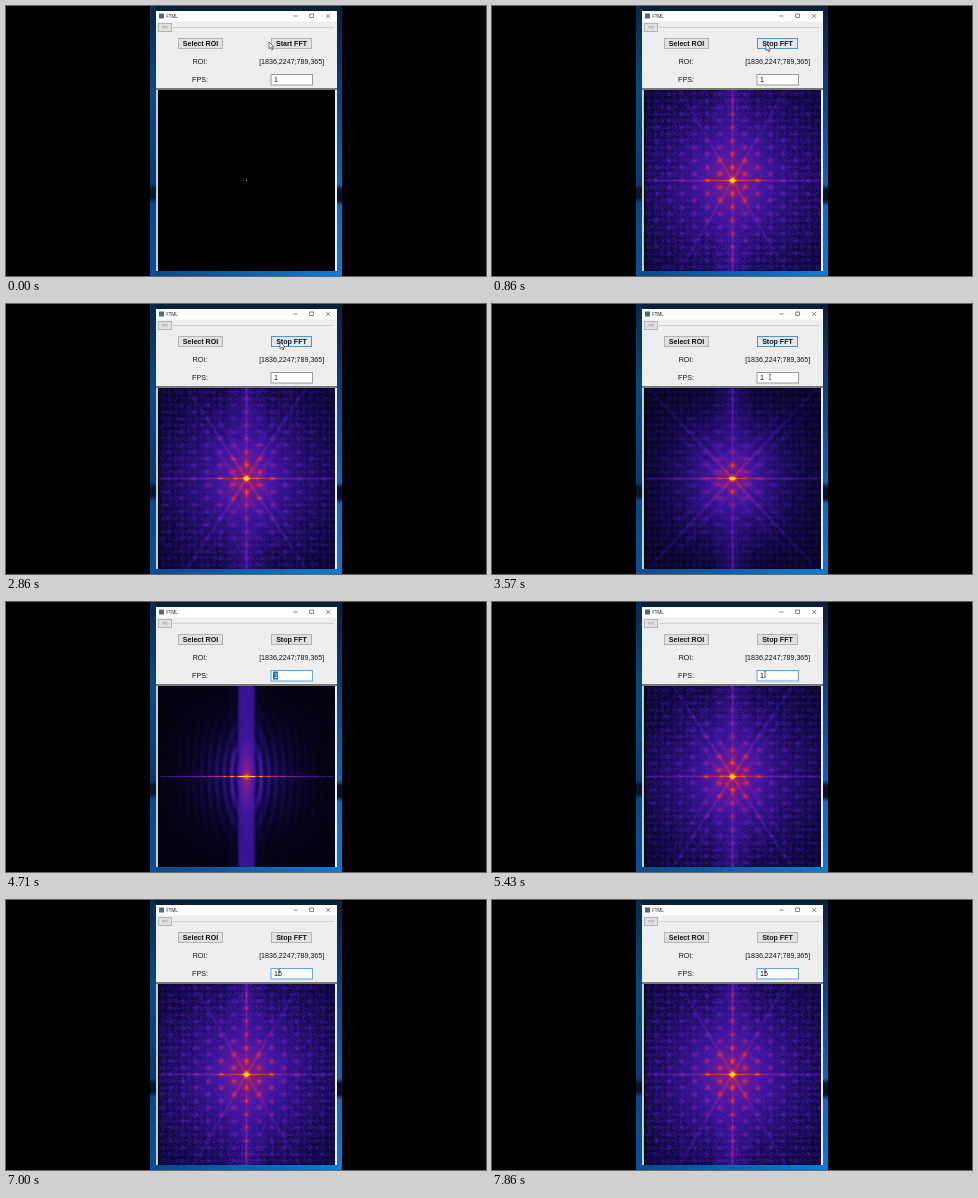
Animation of 480 by 270 pixels, one loop 8 s. Source, as an HTML page with a canvas:

```html
<!DOCTYPE html>
<html lang="en">
<head>
<meta charset="utf-8">
<title>Live FFT</title>
<style>
  html, body { margin: 0; width: 100%; height: 100%; overflow: hidden; background: #000; }
  svg, canvas { position: absolute; left: 0; top: 0; display: block; }
  canvas { left: 153px; top: 84px; }
  text { font: 7.1px "Liberation Sans", Arial, sans-serif; fill: #111; }
  .bold { font-weight: bold; }
  .mid { text-anchor: middle; }
  .title { font: 4.6px "Open Sans", sans-serif; }
  .button { fill: #e1e1e1; stroke: #b4b4b4; }
  .button.active { fill: #e1e8ef; stroke: #4a96d2; }
  #box { fill: #fff; stroke: #9a9a9a; }
  #box.active { stroke: #5fa6de; }
</style>
</head>
<body>
<svg width="480" height="270" viewBox="0 0 480 270">
  <defs>
    <linearGradient id="left" x2="0" y2="1">
      <stop offset="0" stop-color="#062a50"/><stop offset=".32" stop-color="#0c4a82"/>
      <stop offset=".66" stop-color="#083a70"/><stop offset=".68" stop-color="#031630"/>
      <stop offset=".71" stop-color="#031630"/><stop offset=".73" stop-color="#084888"/>
      <stop offset="1" stop-color="#0a5098"/>
    </linearGradient>
    <linearGradient id="right" x2="0" y2="1">
      <stop offset="0" stop-color="#05203f"/><stop offset=".3" stop-color="#0a407c"/>
      <stop offset=".66" stop-color="#0b66ba"/><stop offset=".68" stop-color="#02142c"/>
      <stop offset=".72" stop-color="#02142c"/><stop offset=".74" stop-color="#0a6cc4"/>
      <stop offset="1" stop-color="#0a7ad2"/>
    </linearGradient>
    <linearGradient id="bottom">
      <stop offset="0" stop-color="#084a8c"/><stop offset="1" stop-color="#0a7ad2"/>
    </linearGradient>
  </defs>

  <rect x="144" width="96" height="270" fill="url(#left)"/>
  <rect x="240" width="96" height="270" fill="url(#right)"/>
  <rect x="149" width="182" height="5" fill="#06203c"/>
  <rect x="149" y="265" width="182" height="5" fill="url(#bottom)"/>

  <rect x="150" y="5" width="181" height="260" fill="#eee"/>
  <rect x="150" y="5" width="181" height="10.5" fill="#fff"/>
  <rect x="153" y="7.5" width="5" height="5" fill="#53687c"/>
  <text class="title" x="160.3" y="11.7">FTML</text>
  <g fill="none" stroke="#333" stroke-width=".6">
    <path d="M287.5 10h4M320.2 8l4 4m0-4l-4 4"/>
    <rect x="303.8" y="8" width="3.6" height="3.6"/>
  </g>

  <rect x="152.5" y="17.5" width="13" height="8" class="button"/>
  <text class="mid" x="159" y="23.2" style="font-size:5px;fill:#777">&lt;&lt;</text>
  <path d="M167 21.5h161" stroke="#d0d0d0"/>

  <rect class="button" x="172.5" y="32.5" width="44" height="10"/>
  <text class="bold mid" x="194.5" y="39.8">Select ROI</text>
  <rect id="toggle" class="button" x="265.5" y="32.5" width="40" height="10"/>
  <text id="toggleLabel" class="bold mid" x="285.5" y="39.8">Start FFT</text>
  <text class="mid" x="194" y="58">ROI:</text>
  <text class="mid" x="285.7" y="58">[1836,2247;789,365]</text>
  <text class="mid" x="194" y="76">FPS:</text>
  <rect id="box" x="265" y="68.5" width="41.5" height="10.5"/>
  <rect id="selection" x="267" y="69.5" width="5" height="8" fill="#0078d7"/>
  <text id="fps" x="268" y="75.9">1</text>

  <rect x="150" y="82" width="181" height="2" fill="#777"/>
  <rect x="150" y="84" width="2" height="181" fill="#ccc"/>
  <rect x="152" y="84" width="177" height="181" fill="#000"/>
  <rect x="328.5" y="84" width="2.5" height="181" fill="#eee"/>

  <path id="arrow" d="M0 0v6.8l1.6-1.5 1.2 2.6 1.1-.5-1.2-2.5h2.2z" fill="#fff" stroke="#222" stroke-width=".6"/>
  <path id="beam" d="M-1.2-2.8h2.4M0-2.8v5.6M-1.2 2.8h2.4" fill="none" stroke="#333" stroke-width=".6"/>
</svg>
<canvas id="plot" width="176" height="181"></canvas>

<script>
const LOOP = 8000, TICK = 1000 / 7;
const W = 176, H = 181, CX = 87, CY = 90;
const $ = id => document.getElementById(id);
const plot = $('plot').getContext('2d');
const gauss = (d, s) => Math.exp(-d * d / (2 * s * s));
const wave = (d, period) => Math.cos(2 * Math.PI * d / period);

const COLORS = [
  [0, 0, 0, 0], [.2, 18, 9, 72], [.42, 66, 22, 164], [.56, 125, 28, 145],
  [.7, 212, 40, 62], [.84, 250, 112, 14], [1, 255, 232, 70]
];
function shade(v) {
  v = Math.min(1, Math.max(0, v));
  const k = Math.max(1, COLORS.findIndex(c => c[0] >= v));
  const lo = COLORS[k - 1], hi = COLORS[k];
  const u = (v - lo[0]) / (hi[0] - lo[0]);
  return [1, 2, 3].map(i => lo[i] + (hi[i] - lo[i]) * u);
}

function noise(x, y, seed) {
  if (y < 0 || (y === 0 && x < 0)) { x = -x; y = -y; }
  const n = Math.sin(x * 12.9898 + y * 78.233 + seed * 37.719) * 43758.5453;
  return n - Math.floor(n);
}

// Spots on a sheared lattice, streaks along its main directions.
function lattice(x, y, p) {
  const r = Math.hypot(x, y), ax = Math.abs(x);
  const col = Math.round(x / p.bx);
  const dx = x - col * p.bx;
  const rest = y - col * p.a / 2;
  const dy = rest - Math.round(rest / p.a) * p.a;
  const spot = gauss(dx, p.sx) * gauss(dy, p.sy);
  const outer = 1 - gauss(r, 45);

  let v = p.floor + .27 * Math.exp(-((x / p.spread) ** 2) - (y / (p.spread * 1.1)) ** 2);
  v += .12 * gauss(r, 20);
  v += spot * p.spot * Math.exp(-((r / p.reach) ** 1.5));
  v += outer * (.03 * wave(y, 6.65) + .022 * wave(x, 6.4));
  v += (noise(x, y, p.seed) - .5) * (.04 + p.grain * outer);

  for (const side of [-1, 1]) {
    const d = x * Math.sin(p.angle) + side * y * Math.cos(p.angle);
    v += p.streak * gauss(d, 1.1) * (.5 + .5 * Math.exp(-r / 45));
    v += p.side * gauss(Math.abs(d) - 9, 1.5) * gauss(r, 75);
  }
  v += outer * gauss(x, 4.5) * (.17 + .035 * wave(x, 4));
  v += outer * .07 * (gauss(ax - 10, 1.3) + gauss(ax - 16, 1.5));
  v += gauss(y, .7) * (.1 + .13 * Math.exp(-ax / 45));
  v += gauss(x, .8) * .07;
  return v + .13 * gauss(r, 2.5);
}

// Defocused view: one wide band and soft curved fringes.
function blurred(x, y, p) {
  const r = Math.hypot(x, y), ax = Math.abs(x);
  const fringe = .72 + .28 * wave(Math.hypot(x, y * .4), 7.5);
  let v = .045 + .34 * Math.exp(-((x / 48) ** 2) - (y / 46) ** 2) * fringe;
  const band = 1 / (1 + Math.exp((ax - 8.5) * 1.3));
  v = v * (1 - band) + band * (.38 + .2 * Math.exp(-((x / 7) ** 2) - (y / 28) ** 2));
  v += .08 * gauss(ax - 14, 2) * gauss(y, 65);
  v += (noise(x, y, p.seed) - .5) * .035;
  v += gauss(y, .5) * (.22 + .26 * Math.exp(-((x / 65) ** 2)) + .06 * wave(x, 7));
  return v + .2 * gauss(r, 2.5);
}

function render(field, params) {
  const canvas = document.createElement('canvas');
  canvas.width = W;
  canvas.height = H;
  const ctx = canvas.getContext('2d'), image = ctx.createImageData(W, H);
  for (let i = 0; i < W * H; i++) {
    const x = i % W - CX, y = Math.floor(i / W) - CY;
    image.data.set([...shade(field(x, y, params)), 255], i * 4);
  }
  ctx.putImageData(image, 0, 0);
  return canvas;
}

const blank = render((x, y) => x === 0 && y === 0 ? 1 : 0);
const sharp = render(lattice, {
  a: 13.3, bx: 12.6, sx: 1.9, sy: 1.8, spot: .22, reach: 85, floor: .15, spread: 84,
  angle: 1.04, streak: .1, side: 0, grain: .11, seed: 1
});
const streaked = render(lattice, {
  a: 13.3, bx: 13.2, sx: 2.2, sy: 1.7, spot: .2, reach: 75, floor: .13, spread: 80,
  angle: .99, streak: .13, side: .05, grain: .09, seed: 2
});
const smeared = render(lattice, {
  a: 13.3, bx: 13.6, sx: 3.2, sy: 1.5, spot: .17, reach: 55, floor: .09, spread: 72,
  angle: .82, streak: .14, side: .05, grain: .06, seed: 3
});
const soft = render(blurred, { seed: 4 });

const VIEWS = [[0, blank], [710, sharp], [2140, streaked], [3140, smeared], [4140, soft], [5280, streaked], [6710, sharp]];
const LABELS = [[0, '1'], [6700, '15']];
const POINTER = [[0, 263, 36], [140, 263, 36], [420, 274, 38], [2900, 274, 38], [3400, 278, 73], [3650, 278, 73], [4100, 270, 73], [4900, 270, 73], [5300, 273, 72.5], [LOOP, 273, 72.5]];

const current = (list, t) => list.filter(e => e[0] <= t).pop()[1];
function pointerAt(t) {
  const k = POINTER.findIndex(p => p[0] > t);
  const [t0, x0, y0] = POINTER[k - 1], [t1, x1, y1] = POINTER[k];
  const u = (t - t0) / (t1 - t0), e = u * u * (3 - 2 * u);
  return [x0 + (x1 - x0) * e, y0 + (y1 - y0) * e];
}

function draw(now) {
  const t = Math.floor(now % LOOP / TICK + .02) * TICK % LOOP;
  plot.drawImage(current(VIEWS, t + 5), 0, 0);

  const running = t > 400, focused = t > 3700, selected = t > 3950 && t < 5000;
  $('toggleLabel').textContent = running ? 'Stop FFT' : 'Start FFT';
  $('toggle').classList.toggle('active', running && !focused);
  $('box').classList.toggle('active', focused);
  $('selection').style.display = selected ? '' : 'none';
  $('fps').textContent = current(LABELS, t);
  $('fps').style.fill = selected ? '#fff' : '';

  const [x, y] = pointerAt(t), inBox = y > 66;
  $('arrow').style.display = inBox ? 'none' : '';
  $('beam').style.display = inBox && !selected ? '' : 'none';
  $(inBox ? 'beam' : 'arrow').setAttribute('transform', `translate(${x} ${y})`);
}

const start = performance.now();
function loop() {
  draw(performance.now() - start);
  requestAnimationFrame(loop);
}
loop();
</script>
</body>
</html>
```
